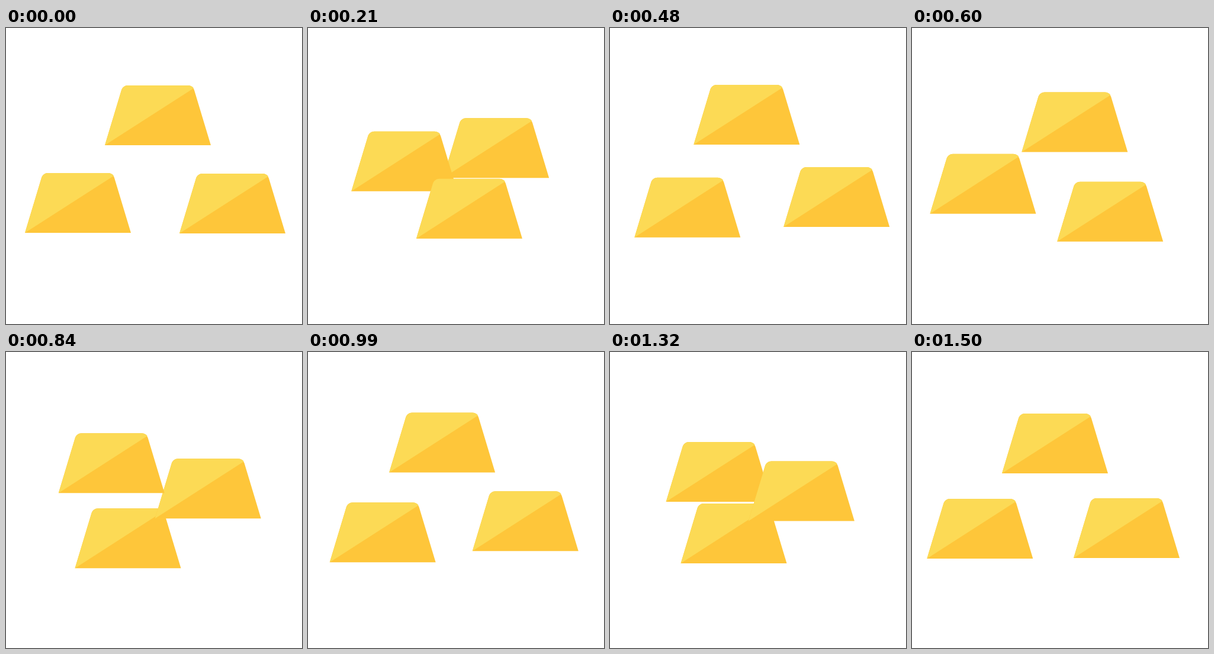
Animation of 500 by 500 pixels, one loop 1650 ms. Source, as an HTML page:

```html
<!DOCTYPE html>
<html>
<head>
<meta charset="utf-8">
<style>
  html, body { margin: 0; width: 100%; height: 100%; overflow: hidden; background: #fff; }
  svg { display: block; width: 100vw; height: 100vh; }
</style>
</head>
<body>
<svg id="stage" viewBox="0 0 500 500">
  <defs>
    <g id="bar">
      <path fill="#fec63a" d="M0 0L28 -93C29.5 -98 34 -101 38.5 -101H140.5C145 -101 149.5 -98 151 -93L179 0Z"/>
      <path fill="#fcda55" d="M0 0L28 -93C29.5 -98 34 -101 38.5 -101H140.5C144.5 -101 148 -99.5 150 -96.3Z"/>
    </g>
  </defs>
</svg>
<script>
const NS = 'http://www.w3.org/2000/svg';
const STEP = 30, LOOP = 1650;
const KEYS = [0, 17, 34, 50]; // in steps

// Bottom-left corner of each bar at every key, back bar first
const ROUTES = [
  [[167, 198], [291, 347], [22.3, 348.3], [152, 205]],
  [[32, 346], [152.5, 194], [275, 348], [25.3, 349]],
  [[293, 347], [27, 347.5], [148.8, 201], [273, 348]]
];

const svgNode = name => document.createElementNS(NS, name);

// Smooth tangent at inner points, none at the ends
const handle = (points, i) => [0, 1].map(axis =>
  i > 0 && i < points.length - 1 ? (points[i + 1][axis] - points[i - 1][axis]) / 6 : 0);

function makeSegment(points, i) {
  const [from, to] = [points[i], points[i + 1]];
  const [out, into] = [handle(points, i), handle(points, i + 1)];
  const path = svgNode('path');
  path.setAttribute('d', `M${from}C${from[0] + out[0]},${from[1] + out[1]} ` +
    `${to[0] - into[0]},${to[1] - into[1]} ${to}`);
  return { path, length: path.getTotalLength() };
}

const bars = ROUTES.map(points => {
  const node = svgNode('use');
  node.setAttribute('href', '#bar');
  document.getElementById('stage').append(node);
  return { node, segments: [0, 1, 2].map(i => makeSegment(points, i)) };
});

function draw(now) {
  const step = Math.min(50, Math.floor(now % LOOP / STEP));
  const i = step < KEYS[1] ? 0 : step < KEYS[2] ? 1 : 2;
  const progress = (step - KEYS[i]) / (KEYS[i + 1] - KEYS[i]);
  for (const { node, segments } of bars) {
    const { path, length } = segments[i];
    const { x, y } = path.getPointAtLength(progress * length);
    node.setAttribute('transform', `translate(${x} ${y})`);
  }
}

const start = performance.now();
function tick() {
  draw(performance.now() - start);
  requestAnimationFrame(tick);
}
tick();
</script>
</body>
</html>
```
